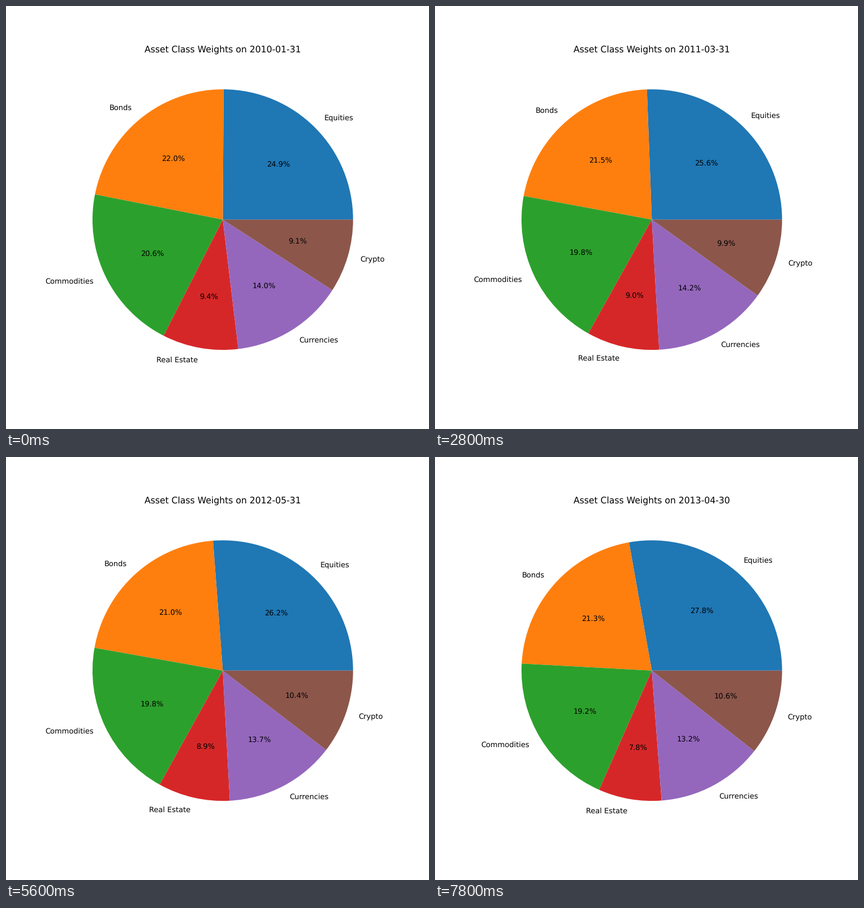
Recreate the animation shown at these times as a matplotlib script. Size 748 by 748 pixels, loop 8000 ms.

```python
import matplotlib.pyplot as plt
import numpy as np
from matplotlib.animation import FuncAnimation

FRAMES = 40
INTERVAL = 200

plt.rcParams["text.hinting"] = "none"

# Weights in percent drift linearly between a few months; crypto is the rest
MONTHS = [0, 6, 14, 25, 31, 39]
PATHS = {
    "Equities": [24.9, 25, 25.6, 26, 26.4, 27.8],
    "Bonds": [22, 22.3, 21.5, 21.2, 20.8, 21.34],
    "Commodities": [20.6, 20.4, 19.8, 19.7, 19.8, 19.24],
    "Real Estate": [9.4, 9, 9, 9.16, 8.67, 7.82],
    "Currencies": [14, 14, 14.2, 13.57, 13.86, 13.21],
}
LABELS = [*PATHS, "Crypto"]


def weights_at(month):
    weights = [np.interp(month, MONTHS, path) for path in PATHS.values()]
    return [*weights, 100 - sum(weights)]


def month_end(month):
    following = np.datetime64("2010-02") + month
    return following.astype("datetime64[D]") - 1


fig, ax = plt.subplots(figsize=(8, 8), dpi=93.5)


def update(month):
    ax.clear()
    ax.pie(weights_at(month), labels=LABELS, autopct="%1.1f%%")
    ax.set_title(f"Asset Class Weights on {month_end(month)}")
    return []


anim = FuncAnimation(fig, update, frames=FRAMES, interval=INTERVAL,
                     repeat=True, repeat_delay=0)
plt.show()
```
